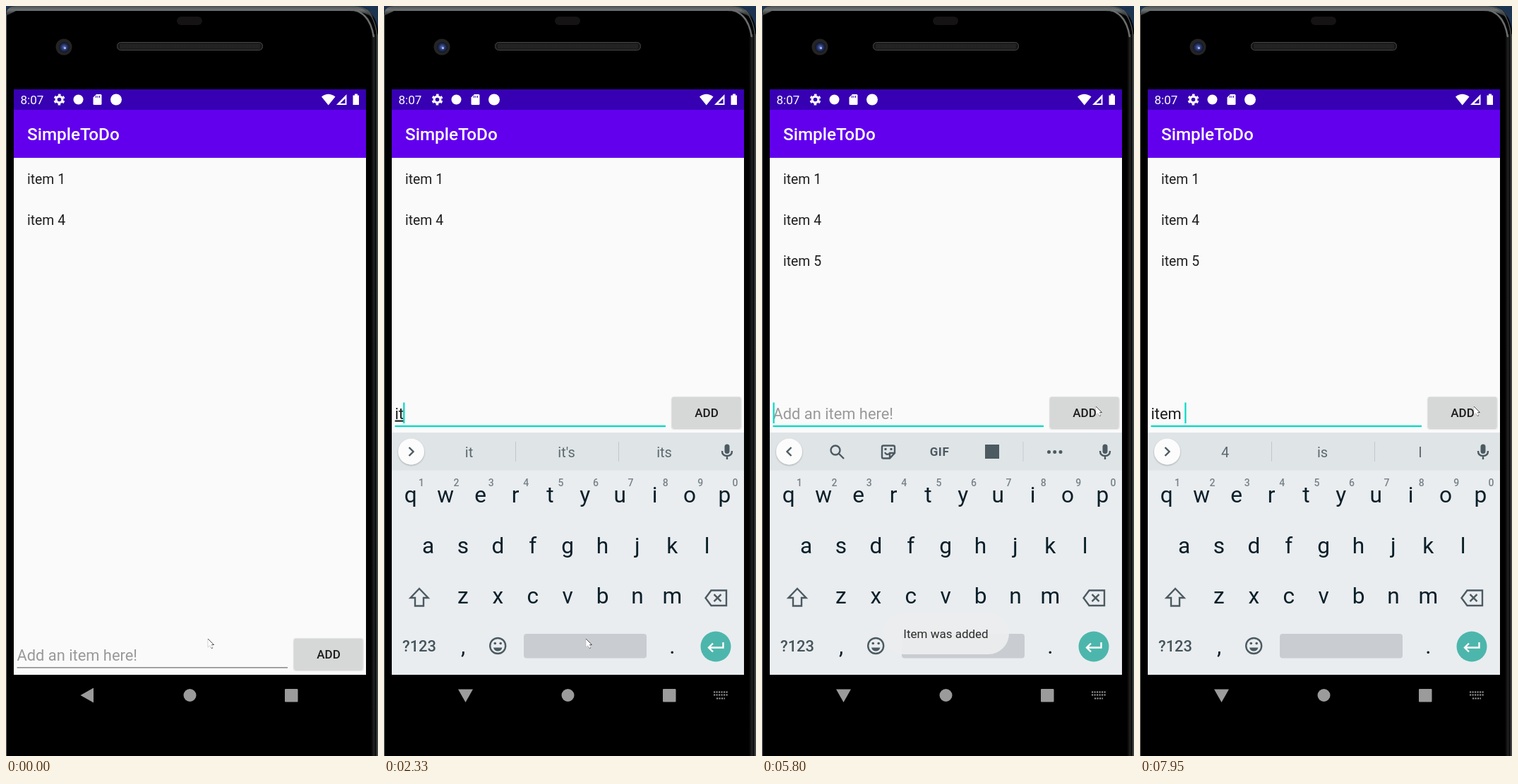
These frames come from a looping animation (527x1062 px, 8 s). An HTML page:

```html
<!DOCTYPE html>
<html lang="en">
<head>
<meta charset="utf-8">
<title>To-do list</title>
<style>
  html, body { margin: 0; width: 100%; height: 100%; overflow: hidden; background: #000; }
  svg { display: block; width: 527px; height: 1062px; font-family: Roboto, sans-serif; }
  text { white-space: pre; }
  .mid { text-anchor: middle; }
  .key { font-size: 31.6px; fill: #0b1f29; }
  .digit { font-size: 14px; font-weight: 500; fill: #778288; }
  .item { font-size: 19.4px; fill: #1f1f1f; }
  .word { font-size: 20px; fill: #5d686f; }
  .field { font-size: 21.86px; }
  .icon { fill: none; stroke: #4c5a61; stroke-width: 2.4; }
  .solid { fill: #4c5a61; }
</style>
</head>
<body>
<svg viewBox="0 0 527 1062">
  <defs>
    <linearGradient id="side">
      <stop offset="0" stop-color="#000"/><stop offset=".45" stop-color="#222"/>
      <stop offset=".6" stop-color="#0c0c0c"/><stop offset="1" stop-color="#2c2d2d"/>
    </linearGradient>
    <linearGradient id="top" x2="0" y2="1">
      <stop offset="0" stop-color="#4b4f4f"/><stop offset=".3" stop-color="#6d7272"/><stop offset="1" stop-color="#000"/>
    </linearGradient>
    <radialGradient id="lens">
      <stop offset="0" stop-color="#6376c4"/><stop offset=".5" stop-color="#28376f"/><stop offset="1" stop-color="#10131f"/>
    </radialGradient>
    <filter id="shadow" x="-20%" y="-20%" width="140%" height="150%">
      <feDropShadow dx="0" dy="1" stdDeviation="1" flood-opacity=".3"/>
    </filter>
    <filter id="raised" x="-20%" y="-20%" width="140%" height="150%">
      <feDropShadow dx="0" dy="1.5" stdDeviation="2" flood-opacity=".4"/>
    </filter>
  </defs>

  <!-- Phone body -->
  <rect width="527" height="1062" fill="#1d3450"/>
  <path d="M0 1062V14Q0 0 14 0H492Q523 0 527 36V1062Z"/>
  <path d="M0 14Q0 0 14 0H492Q514 0 522 18Q508 7 486 7H14Z" fill="url(#top)"/>
  <path d="M517 40H527V1062H517Z" fill="url(#side)"/>
  <path d="M484 4.500Q515 5 521 44" fill="none" stroke="#6a6d6d" stroke-width="2.500"/>
  <path d="M500 1.500Q522 6 526 44V1062" fill="none" stroke="#4c4f4f" stroke-width="1.500"/>
  <path d="M.5 1062V12" stroke="#5c5f60"/>
  <rect x="242" y="15" width="36" height="12" rx="6" fill="#151314"/>
  <rect x="157.5" y="51.5" width="206" height="11" rx="5" fill="#191919" stroke="#484848"/>
  <path d="M162 57H359" stroke="#2c2c2c" stroke-width="7" stroke-dasharray="1 1"/>
  <circle cx="82" cy="58" r="11.5" fill="#242424"/>
  <circle cx="82.500" cy="58.500" r="7.500" fill="url(#lens)"/>
  <circle cx="83.500" cy="59.500" r="1.500" fill="#b4c2ee"/>

  <!-- App -->
  <rect x="11" y="118" width="499" height="829" fill="#fafafa"/>
  <rect x="11" y="118" width="499" height="29" fill="#3700b3"/>
  <rect x="11" y="147" width="499" height="68" fill="#6200ee"/>
  <g fill="#fff">
    <text x="20.5" y="139" font-size="17">8:07</text>
    <circle cx="75.5" cy="132.5" r="4.400" fill="none" stroke="#fff" stroke-width="3.200"/>
    <circle cx="75.5" cy="132.5" r="6.8" fill="none" stroke="#fff" stroke-width="2.4" stroke-dasharray="3.6 3.52" stroke-dashoffset="-1.780"/>
    <circle cx="102.5" cy="132.5" r="7"/>
    <path d="M128 125H134Q135.500 125 135.500 126.500V138.500Q135.500 140 134 140H125Q123.500 140 123.500 138.500V129.500Z"/>
    <path d="M127.500 127v3M130 127v3M132.500 127v3" stroke="#3700b3"/>
    <circle cx="156" cy="132.500" r="8"/>
    <path d="M447 128.500Q456.500 121 466.500 128.500L456.700 140.500Z"/>
    <path d="M482.500 125V140H468Z"/>
    <path d="M480.500 131V138H473.500Z" fill="#3700b3"/>
    <path d="M491.500 126.500H494V124.500H498V126.500H500V140H491.500Z"/>
    <text x="30" y="190" font-size="24.3" font-weight="500">SimpleToDo</text>
  </g>
  <text class="item" x="30" y="251.500">item 1</text>
  <text class="item" x="30" y="309.500">item 4</text>
  <text class="item" x="30" y="368" id="added">item 5</text>

  <!-- Input row -->
  <g id="row">
    <text id="field" class="field" x="15.500" y="584.500"></text>
    <rect id="line" x="15.500" width="383.500"/>
    <rect id="caret" y="561.500" width="2.200" height="29.500" fill="#03dac5"/>
    <rect id="button" x="408" y="553.500" width="97.500" height="44" rx="2"/>
    <text class="mid" x="457" y="582" font-size="17" font-weight="500" fill="#1c1c1c">ADD</text>
  </g>

  <!-- Keyboard -->
  <g id="keyboard">
    <rect x="11" y="604" width="499" height="343" fill="#e9edf0"/>
    <rect x="11" y="604" width="499" height="53.500" fill="#dfe4e7"/>
    <circle cx="38.500" cy="631" r="18.500" fill="#fcfcfc" filter="url(#shadow)"/>
    <path id="chevron" d="M41.500 625L35.500 631L41.500 637" class="icon"/>
    <g id="tools">
      <circle class="icon" cx="104" cy="629" r="6.500"/>
      <path class="icon" d="M109 634L116 641" stroke-width="3"/>
      <path class="icon" d="M172 622.500H186Q188 622.500 188 624.500V633L181 640.500H172Q170 640.500 170 638.500V624.500Q170 622.500 172 622.500ZM181 640V633H188M174 632Q176.500 636.500 180 634" stroke-width="2"/>
      <path class="solid" d="M173.500 626h3v3h-3zM181.500 626h3v3h-3z"/>
      <text class="mid solid" x="251.500" y="637" font-size="17" font-weight="700" letter-spacing=".6">GIF</text>
      <rect class="solid" x="316" y="621" width="20" height="20"/>
      <path d="M370 617V645" stroke="#c6ccd0"/>
      <path d="M406.500 631.500h.01M414.700 631.500h.01M423 631.500h.01" stroke="#4c5a61" stroke-width="5" stroke-linecap="round"/>
    </g>
    <g id="words">
      <path d="M186.500 617V645M332.500 617V645" stroke="#c0c7cb"/>
      <text class="word mid" x="120.500" y="639"></text>
      <text class="word mid" x="258.500" y="639"></text>
      <text class="word mid" x="397" y="639"></text>
    </g>
    <rect class="solid" x="482.500" y="620.500" width="7" height="13.500" rx="3.500"/>
    <path class="icon" d="M479 630Q479 637 486 637T493 630M486 637V642" stroke-width="2"/>
    <g id="keys"></g>
    <path class="icon" d="M50 825L62.500 838H56V849.500H44V838H37.500Z"/>
    <path class="icon" d="M463.500 827.500H485V849H463.500L455.500 838.200ZM467.500 833.200L477.500 843.200M477.500 833.200L467.500 843.200"/>
    <text class="mid" x="50" y="914" font-size="21.900" font-weight="500" fill="#45545b">?123</text>
    <circle class="icon" cx="161.200" cy="906" r="11"/>
    <path class="solid" d="M155 908.500H167.500Q166 913.500 161.200 913.500T155 908.500Z"/>
    <circle class="solid" cx="157.300" cy="902.500" r="1.800"/>
    <circle class="solid" cx="165.200" cy="902.500" r="1.800"/>
    <rect x="198" y="889" width="174" height="34.500" rx="4" fill="#c9ccd1"/>
    <circle cx="470" cy="907" r="21.500" fill="#4db6ac"/>
    <path d="M480.500 901V908.500H461M466 902.500L460 908.500L466 914.500" fill="none" stroke="#fff" stroke-width="2.400"/>
  </g>
  <g id="toast">
    <rect x="171" y="859" width="179" height="59" rx="29.500" fill="#ecedee"/>
    <text class="mid" x="260.500" y="894.500" font-size="17" fill="#222">Item was added</text>
  </g>

  <!-- Navigation bar -->
  <g fill="#9b9b9b">
    <path id="back" d="M105.500 976L124 965.500V986.500Z"/>
    <circle cx="260.500" cy="976" r="9"/>
    <rect x="395" y="967" width="18.500" height="18.500" rx="1"/>
    <path id="navKeys" d="M467 971.500H487M467 975.500H487M471 980.500H483" stroke="#9b9b9b" stroke-width="2.200" stroke-dasharray="2.200 1.300"/>
  </g>
  <g id="mouse">
    <path d="M0 0L8.500 8.500H5L7 13L5 14L3 9.500L0 12Z" fill="#fff" stroke="#aaa" stroke-width=".5"/>
    <path d="M0 0L8.500 8.500H5.500M4.500 12.500L5.500 13.500L7 12.500" fill="none" stroke="#444" stroke-width=".9"/>
  </g>
</svg>
<script>
const $ = id => document.getElementById(id);
const DURATION = 8000;
const HINT = "Add an item here!";

// Tracks hold [start, value] pairs; every value lasts until the next start.
const texts = [[0, HINT], [2330, "it"], [2450, "item"], [3380, "item "], [3680, "item 5"],
  [5410, HINT], [7230, "it"], [7380, "item"], [7950, "item "]];
const guesses = [[0, ""], [2330, "it,it's,its"], [2450, "item,items,item's"], [3380, "4,is,I"], [3810, ""],
  [7230, "it,it's,its"], [7380, "item,items,item's"], [7950, "4,is,I"]];
const pointer = [[0, [286, 896]], [4240, [310, 800]], [4370, [362, 624]], [4520, [426, 524]],
  [4670, [472, 538]], [4820, [473, 558]], [4950, [473, 567]]];
const buttonFill = [[0, "#d6d7d7"], [5260, "#bcbdbd"], [5410, "#c4c5c5"], [5560, "#d6d7d7"]];
const buttonShadow = [[0, "shadow"], [5260, "raised"], [5560, "shadow"]];
const toastAlpha = [[0, 0], [5560, .3], [5680, .7], [5800, .95], [5950, 1],
  [7380, .8], [7510, .55], [7660, .3], [7810, .12], [7950, 0]];
const backTurn = [[0, 0], [520, -45], [670, -90]];
const blinks = [400, 940, 1340, 1910, 2330, 2980, 3380, 4240, 4820, 5260, 5410, 5950, 6390, 6950, 7230];
const caretX = { [HINT]: 15.5, "it": 27.2, "item": 57.5, "item ": 63.3, "item 5": 75.5 };

const at = (track, t) => track.findLast(([start]) => start <= t)[1];
const show = (id, on) => $(id).setAttribute("visibility", on ? "visible" : "hidden");
const set = (id, attrs) => { for (const k in attrs) $(id).setAttribute(k, attrs[k]); };

function label(x, y, text, style) {
  return `<text class="mid ${style}" x="${x}" y="${y}">${text}</text>`;
}

function buildKeys() {
  const pitch = 49.4, center = 260.1;
  let html = label(112, 917, ",", "key") + label(408.5, 917, ".", "key");
  ["qwertyuiop", "asdfghjkl", "zxcvbnm"].forEach((letters, row) =>
    [...letters].forEach((c, i) =>
      html += label(center + pitch * (i - (letters.length - 1) / 2), 703 + 71.5 * row, c, "key")));
  for (let i = 0; i < 10; i++) html += label(53 + pitch * i, 680, (i + 1) % 10, "digit");
  $("keys").innerHTML = html;
}

function render(t) {
  const text = at(texts, t), words = at(guesses, t), focused = t >= 400, open = t >= 670;
  const composing = text === "it" || text === "item";
  set("row", { transform: `translate(0 ${t < 520 ? 342 : 0})` });
  $("field").textContent = text;
  set("field", { fill: text === HINT ? "#999" : "#1f1f1f", "text-decoration": composing ? "underline" : "none" });
  set("line", focused ? { y: 593.8, height: 2.3, fill: "#03dac5" } : { y: 594.2, height: 1.3, fill: "#777" });
  set("caret", { x: caretX[text] });
  show("caret", blinks.filter(b => b <= t).length % 2);
  set("button", { fill: at(buttonFill, t), filter: `url(#${at(buttonShadow, t)})` });

  show("added", t >= 5560);
  set("toast", { opacity: at(toastAlpha, t) });
  $("keyboard").style.display = open ? "" : "none";
  $("tools").style.display = words ? "none" : "";
  $("words").style.display = words ? "" : "none";
  const parts = words.split(",");
  $("words").querySelectorAll("text").forEach((el, i) => el.textContent = parts[i] || "");
  set("chevron", { transform: words ? "rotate(180 38.5 631)" : "" });

  set("back", { transform: `rotate(${at(backTurn, t)} 115.5 976)` });
  show("navKeys", open);
  set("mouse", { transform: `translate(${at(pointer, t)})` });
}

function tick() {
  render(performance.now() % DURATION);
  requestAnimationFrame(tick);
}

buildKeys();
tick();
</script>
</body>
</html>
```
